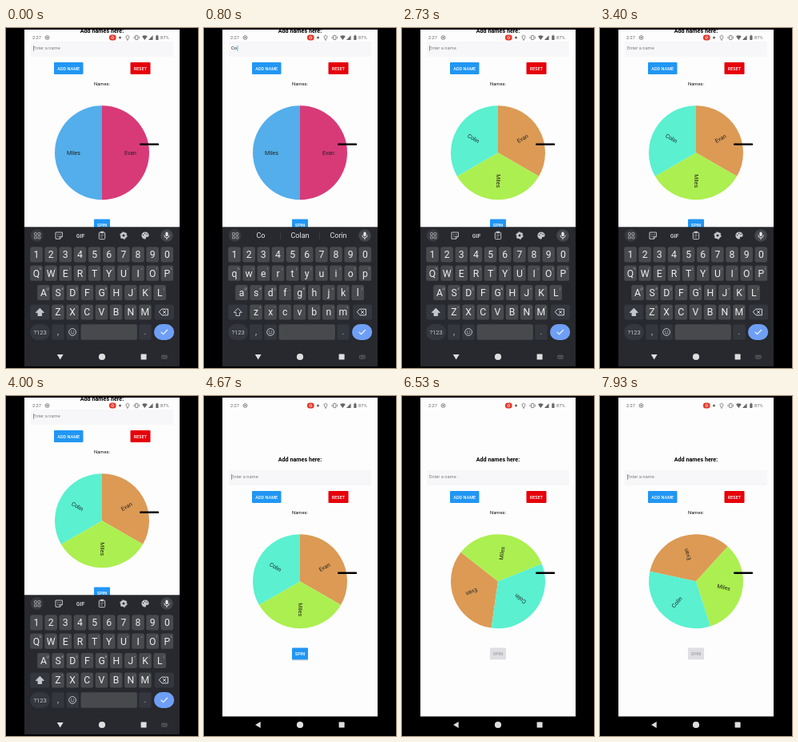
An HTML page that plays this animation: 240x426 px, repeating every 8 s.

```html
<!DOCTYPE html>
<html lang="en">
<head>
<meta charset="utf-8">
<title>Name wheel</title>
<style>
html, body { margin: 0; width: 100%; height: 100%; overflow: hidden; background: #000; }
svg { display: block; width: 100%; height: 100%; }
text { font-family: Roboto, "Noto Sans", sans-serif; }
</style>
</head>
<body>
<svg id="stage" viewBox="0 0 240 426"></svg>
<script>
const LOOP = 8000, ADD = 2300, HIDE = 4270, SLIDE = 200, SPIN = 4880;
const SHIFT = 76, CX = 120, CY = 156.2, R = 59;
const LEFT = 23, WIDTH = 194, KEYS_TOP = 249.3;
const ENTRY = "Colin", KEY_TIMES = [420, 680, 900, 1150, 1400];
const PANEL = "#27292e", KEY = "#47494d", DIM = "#34373e", INK = "#ececee", SOFT = "#c4c5c9";

const rect = (x, y, w, h, fill, r = 0, extra = "") =>
  `<rect x="${x}" y="${y}" width="${w}" height="${h}" rx="${r}" fill="${fill}" ${extra}/>`;
const text = (x, y, str, size, fill, extra = "") =>
  `<text x="${x}" y="${y}" font-size="${size}" fill="${fill}" text-anchor="middle" ${extra}>${str}</text>`;
const circle = (x, y, r, fill, extra = "") =>
  `<circle cx="${x}" cy="${y}" r="${r}" fill="${fill}" ${extra}/>`;
const line = (d, color, w = 1, extra = "") =>
  `<path d="${d}" fill="none" stroke="${color}" stroke-width="${w}" stroke-linecap="round" stroke-linejoin="round" ${extra}/>`;
const group = (id, body, extra = "") => `<g id="${id}" ${extra}>${body}</g>`;
const escape = s => s.replace(/&/g, "&amp;").replace(/</g, "&lt;").replace(/>/g, "&gt;");

function pie(slices) {
  const step = 360 / slices.length;
  const at = (deg, r) => {
    const a = deg * Math.PI / 180;
    return (CX + r * Math.cos(a)).toFixed(2) + " " + (CY + r * Math.sin(a)).toFixed(2);
  };
  return slices.map(([name, color], i) => {
    const a = -90 + i * step, mid = a + step / 2;
    const turn = mid > 90 ? mid - 180 : mid;
    const shape = `<path d="M${CX} ${CY}L${at(a, R)}A${R} ${R} 0 0 1 ${at(a + step, R)}Z" fill="${color}"/>`;
    return shape + text(0, 2.4, name, 7, "#222", `transform="translate(${at(mid, 35.5)}) rotate(${turn})"`);
  }).join("");
}

function page() {
  const label = `font-weight="500"`;
  return text(120, 5.6, "Add names here:", 7.2, "#000", `font-weight="700"`)
    + rect(31, 17, 178, 19, "#f7f6f8")
    + `<text id="entry" x="34" y="27.2" font-size="5.75"></text>`
    + rect(34, 22, .8, 7, "#2fa8d0", 0, `id="cursor"`)
    + rect(60, 43, 36.5, 15, "#2196f3", 1) + text(78.2, 52.6, "ADD NAME", 5.5, "#fff", label)
    + rect(155.5, 43, 25, 15, "#e6000a", 1) + text(168, 52.6, "RESET", 5.5, "#fff", label)
    + text(120, 72, "Names:", 5.8, "#111")
    + group("pair", pie([["Evan", "#d83a78"], ["Miles", "#53aeeb"]]))
    + group("trio", pie([["Evan", "#dc9a55"], ["Miles", "#acef50"], ["Colin", "#5af0d0"]]))
    + line("M168.2 145.7H190", "#000", 2.4)
    + rect(110, 241, 20, 14.4, "#bbb", 1, `id="shade" opacity=".6"`)
    + rect(110, 239.6, 20, 14.6, "#2196f3", 1, `id="spin"`)
    + text(120, 249, "SPIN", 5.5, "#fff", `id="spinText" ${label}`);
}

function statusBar() {
  const c = "#666";
  return text(38.5, 14, "2:27", 5.7, c)
    + circle(51.5, 12, 2.4, "none", `stroke="${c}" stroke-width=".8"`) + circle(51.5, 12, .9, c)
    + rect(129, 8.5, 8.6, 7, "#e23a2c", 3) + circle(133.3, 12, 1.4, "none", `stroke="#fff" stroke-width=".7"`)
    + circle(142.5, 12, 1.5, c)
    + line("M152 15C148.7 11 150.3 9.3 152 9.3S155.3 11 152 15Z", c, .8)
    + rect(161.7, 9.4, 3.2, 5.2, "none", .5, `stroke="${c}" stroke-width=".8"`)
    + line("M160 11v2M166.6 11v2", c, .7)
    + `<path d="M170 10.4Q173.4 8 176.8 10.4L173.4 15ZM183.6 9.2V15H178Z" fill="${c}"/>`
    + rect(187.3, 9.4, 3.2, 5.6, c, .5) + rect(188.2, 8.7, 1.4, .9, c)
    + text(198.3, 14, "87%", 5.6, c);
}

function keyRow(chars, x, y, hints = "") {
  return [...chars].map((ch, i) => {
    const cx = x + i * 18.15;
    const hint = hints[i] ? text(cx + 5.2, y - 4, escape(hints[i]), 4.4, "#b0b1b5") : "";
    return rect(cx - 7.8, y - 9.6, 15.6, 19.2, KEY, 2.6) + text(cx, y + 4.3, ch, 12.2, INK) + hint;
  }).join("");
}

function letters(change) {
  return keyRow(change("QWERTYUIOP"), 38, 307.2, "%\\|=[]<>{}")
    + keyRow(change("ASDFGHJKL"), 47, 331.5, "@#$_&-+()")
    + keyRow(change("ZXCVBNM"), 65, 356, "*\"':;!?");
}

function smiley(x, y, r) {
  return circle(x, y, r, "none", `stroke="${SOFT}"`)
    + circle(x - 1.5, y - 1, .7, SOFT) + circle(x + 1.5, y - 1, .7, SOFT)
    + line(`M${x - 2} ${y + 1.2}Q${x} ${y + 3.4} ${x + 2} ${y + 1.2}`, SOFT, .8);
}

function toolbar() {
  const sticker = line("M62.4 256h8v5.2l-3 3h-5ZM70.4 261.2h-3v3", SOFT)
    + circle(64.9, 258.6, .7, SOFT) + circle(67.8, 258.6, .7, SOFT) + line("M64.3 260.8Q65.6 262 66.6 261.4", SOFT, .8);
  const clipboard = rect(116.3, 256, 7.4, 8.6, "none", 1, `stroke="${SOFT}"`) + rect(118, 254.8, 4, 2.4, SOFT, .5)
    + line("M118.2 259.4h3.6M118.2 261.8h2.6", SOFT, .7);
  const gear = circle(147, 260, 2.7, "none", `stroke="${SOFT}" stroke-width="2.4"`)
    + circle(147, 260, 4.1, "none", `stroke="${SOFT}" stroke-width="1.2" stroke-dasharray="2.147"`);
  const palette = `<path d="M174 255.4a4.6 4.6 0 1 0 0 9.2c1.5 0 .4-2 1.3-2.5s3.3.3 3.3-2.3-2-4.4-4.6-4.4Z" fill="${SOFT}"/>`
    + circle(171.6, 259.4, .7, PANEL) + circle(173.6, 257.4, .7, PANEL) + circle(176.2, 258.4, .7, PANEL);
  return sticker + text(93, 262.5, "GIF", 7, SOFT, `font-weight="700"`) + clipboard + gear + palette;
}

function suggestions() {
  return text(71, 263, "", 9, INK, `id="typed"`) + text(120, 263, "Colan", 9, INK) + text(168, 263, "Corin", 9, INK)
    + line("M95.5 256v8M144.5 256v8", "#4a4b50", .6);
}

function keyboard() {
  let menu = "";
  for (const x of [35.5, 40])
    for (const y of [256.6, 261]) menu += rect(x, y, 2.9, 2.9, "none", .5, `stroke="#a9aaae" stroke-width=".9"`);
  const mic = circle(201, 260, 7.8, "#43464b") + rect(199.4, 255.4, 3.2, 5.6, INK, 1.6)
    + line("M197.8 259.8a3.2 3.2 0 0 0 6.4 0M201 263v1.6", INK, .9);
  const shift = rect(30.3, 346.4, 24, 19.2, DIM, 2.6)
    + `<path id="shift" d="M42.3 351.2l5 5.2h-2.7v4.1h-4.6v-4.1h-2.7Z" stroke="${SOFT}" stroke-linejoin="round"/>`;
  const erase = rect(186, 346.4, 24, 19.2, DIM, 2.6)
    + line("M195 352.2h7.4v7.6H195l-3.4-3.8ZM196.4 354.3l3.4 3.4M199.8 354.3l-3.4 3.4", INK, .9);
  const bottom = rect(30.3, 371, 24.6, 20, DIM, 9) + text(42.6, 383.8, "?123", 7.6, SOFT)
    + rect(57.2, 371.2, 15.6, 19.6, DIM, 2.6) + text(65, 384.4, ",", 11, SOFT)
    + rect(75.3, 371.2, 15.6, 19.6, DIM, 2.6) + smiley(83.1, 381, 4.4)
    + rect(93.5, 371.2, 70.4, 19.6, KEY, 2.6)
    + rect(166.1, 371.2, 15.6, 19.6, DIM, 2.6) + text(174, 384.4, ".", 11, SOFT)
    + rect(185, 371, 25.2, 20, "#6f9ff5", 10) + line("M194 381.2l2.5 2.5 5-5.2", "#f2f5fc", 1.2);
  return rect(LEFT, KEYS_TOP, WIDTH, 424 - KEYS_TOP, PANEL)
    + circle(38.6, 260, 7.8, "#383a40") + menu + mic
    + group("tools", toolbar()) + group("hints", suggestions())
    + keyRow("1234567890", 38, 283.8)
    + group("upper", letters(s => s)) + group("lower", letters(s => s.toLowerCase()))
    + shift + erase + bottom;
}

function navBar() {
  const c = "#dedede";
  return rect(LEFT, 401.5, WIDTH, 22.5, PANEL, 0, `id="navTint"`)
    + `<path id="back" d="M-3.6 0L3 -3.9V3.9Z" fill="${c}"/>`
    + circle(120, 412, 4.1, c) + rect(168.6, 408.6, 7, 7, c, .6)
    + group("switcher", rect(194.6, 410.2, 6.6, 4, "none", .6, `stroke="#777" stroke-width=".7"`)
      + line("M196 411.6h4M196.8 413h2.4", "#777", .6));
}

document.getElementById("stage").innerHTML =
  `<defs><clipPath id="screen">${rect(LEFT, 2, WIDTH, 399.5, "#000")}</clipPath>
   <clipPath id="above">${rect(LEFT, 2, WIDTH, 422, "#000")}</clipPath></defs>`
  + rect(0, 0, 240, 426, "#000") + rect(LEFT, 2, WIDTH, 399.5, "#fdfdfd")
  + `<g clip-path="url(#screen)">${group("page", page())}${statusBar()}</g>`
  + `<g clip-path="url(#above)">${group("keys", keyboard())}</g>` + navBar();

const el = {};
for (const node of document.querySelectorAll("[id]")) el[node.id] = node;
const show = (node, on) => node.setAttribute("display", on ? "inline" : "none");
const set = (node, name, value) => node.setAttribute(name, value);

function render(t) {
  const typed = t < ADD ? ENTRY.slice(0, KEY_TIMES.filter(k => t >= k).length) : "";
  const added = t >= ADD, typing = typed !== "", open = t < HIDE;

  el.entry.textContent = typed || "Enter a name";
  set(el.entry, "fill", typing ? "#222" : "#7d7d7d");
  set(el.cursor, "x", typing ? 34.6 + el.entry.getComputedTextLength() : 34);
  show(el.cursor, (t + 400) % 1000 < 500);

  show(el.tools, !typing);
  show(el.hints, typing);
  show(el.upper, !typing);
  show(el.lower, typing);
  el.typed.textContent = typed;
  set(el.shift, "fill", typing ? "none" : SOFT);

  const p = Math.min(1, Math.max(0, (t - HIDE) / SLIDE));
  set(el.keys, "transform", `translate(0 ${(175 * p * p).toFixed(2)})`);
  show(el.keys, p < 1);
  show(el.navTint, p < 1);
  show(el.switcher, open);
  set(el.back, "transform", `translate(67.7 412) rotate(${open ? -90 : 0})`);
  set(el.page, "transform", `translate(0 ${open ? 0 : SHIFT})`);

  show(el.pair, !added);
  show(el.trio, added);
  const s = Math.max(0, t - SPIN) / 1000;
  set(el.trio, "transform", `rotate(${(69 * s * s).toFixed(2)} ${CX} ${CY})`);
  const spinning = s > 0;
  set(el.spin, "fill", spinning ? "#dedee3" : "#2196f3");
  set(el.spinText, "fill", spinning ? "#a3a3a6" : "#fff");
  show(el.shade, !spinning);
}

const start = performance.now();
function tick() {
  render((performance.now() - start) % LOOP);
  requestAnimationFrame(tick);
}
tick();
</script>
</body>
</html>
```
